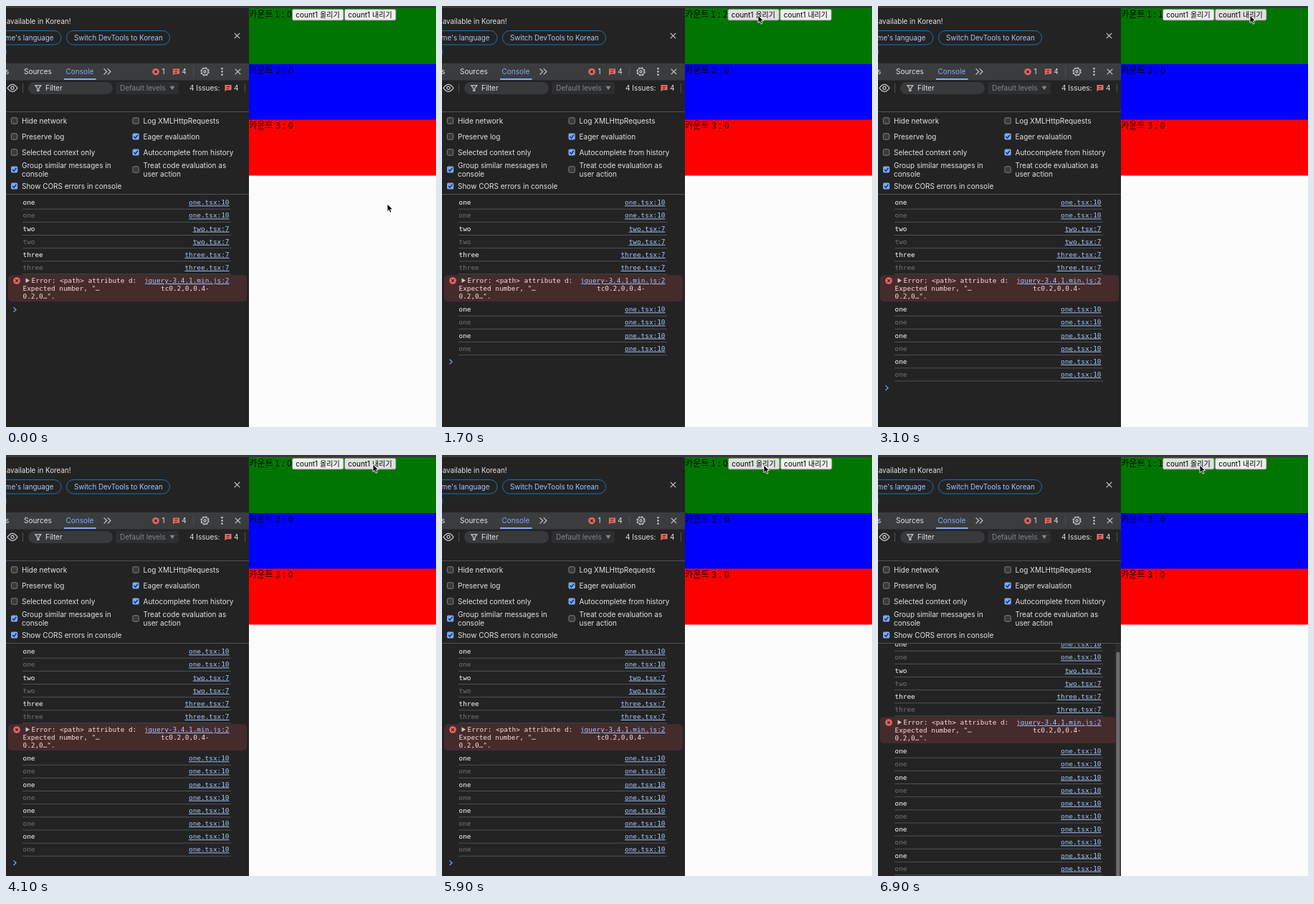
These frames come from a looping animation (600 by 587 pixels, 7000 ms). An HTML page:

```html
<!DOCTYPE html>
<html lang="en">
<head>
<meta charset="utf-8">
<title>Render log</title>
<style>
  html, body { margin: 0; width: 100%; height: 100%; overflow: hidden; background: #232324; }
  svg { display: block; width: 600px; height: 587px; }
  text { white-space: pre; }
  .ui { font: 10px Inter, "Noto Sans", sans-serif; fill: #e3e3e4; }
  .bar { font-size: 9.8px; }
  .blue { fill: #a8c7fa; }
  .mono { font: 9.4px "DejaVu Sans Mono", monospace; fill: #fff; }
  .dim { fill: #757577; }
  .link { fill: #a8c7fa; text-decoration: underline; text-anchor: end; }
  .err { fill: #f9dedc; }
  .page { font: 12px "Noto Sans CJK KR", "Noto Sans CJK", sans-serif; word-spacing: 1.2px; fill: #000; }
  .btn { font: 10px Inter, "Noto Sans CJK KR", "Noto Sans CJK", sans-serif; fill: #000; }
  .line { stroke: #505153; fill: none; }
  .icon { stroke: #c9cacc; stroke-width: 1.2; fill: none; }
</style>
</head>
<body>
<svg viewBox="0 0 600 587">
  <defs>
    <clipPath id="view"><rect y="263" width="339" height="324"/></clipPath>
    <g id="cross"><path class="icon" d="M-3.7-3.7 3.7 3.7M3.7-3.7-3.7 3.7"/></g>
    <g id="fail">
      <circle r="4.8" fill="#e46962"/>
      <path d="M-1.8-1.8 1.8 1.8M1.8-1.8-1.8 1.8" stroke="#33201f" stroke-width="1.2"/>
    </g>
    <g id="issue">
      <path d="M-4.6-4.2H4.6V3H-2.2L-4.6 5.2Z" fill="#e46962"/>
      <path d="M-2-1.8H2M-2 .8H1" stroke="#33201f"/>
    </g>
  </defs>

  <rect width="600" height="587" fill="#232324"/>
  <rect width="600" height="3" fill="#38393a"/>

  <!-- language bar -->
  <text class="ui bar" x="90.5" y="24.5" text-anchor="end">available in Korean!</text>
  <g fill="none" stroke="#1d72ad">
    <rect x="-40" y="34.5" width="117" height="19.5" rx="9.75"/>
    <rect x="84.5" y="34.5" width="144" height="19.5" rx="9.75"/>
    <rect x="-40" y="54.8" width="40.6" height="19.5" rx="9.75"/>
  </g>
  <text class="ui bar blue" x="66.5" y="47.5" text-anchor="end">me's language</text>
  <text class="ui bar blue" x="95" y="47.5">Switch DevTools to Korean</text>
  <use href="#cross" x="322.5" y="41.5"/>

  <!-- tabs -->
  <rect y="80" width="339" height="23.5" fill="#3b3c3d"/>
  <text class="ui" x="-1" y="95">s</text>
  <text class="ui" x="25" y="95">Sources</text>
  <text class="ui" x="83.5" y="95" style="fill:#7cacf8">Console</text>
  <rect x="81" y="101" width="44.5" height="2" fill="#7cacf8"/>
  <path class="icon" d="M136.5 87.3l4.2 4.2-4.2 4.2M141.7 87.3l4.2 4.2-4.2 4.2"/>
  <use href="#fail" x="209" y="91.7"/>
  <text class="ui" x="217.5" y="95.3">1</text>
  <use href="#issue" x="237.5" y="91.7"/>
  <text class="ui" x="245.3" y="95.3">4</text>
  <path class="line" d="M261.5 85V98"/>
  <circle class="icon" cx="277.5" cy="91.5" r="4.6"/>
  <circle class="icon" cx="277.5" cy="91.5" r="5.6" stroke-dasharray="2.4 2"/>
  <circle class="icon" cx="277.5" cy="91.5" r="1.6"/>
  <g fill="#d4d5d6">
    <circle cx="301.5" cy="87.2" r="1.2"/><circle cx="301.5" cy="91.5" r="1.2"/><circle cx="301.5" cy="95.8" r="1.2"/>
  </g>
  <use href="#cross" x="323.5" y="91.5"/>

  <!-- filter bar -->
  <path class="icon" d="M2 114.3Q9 104.3 16 114.3Q9 124.3 2 114.3Z"/>
  <circle class="icon" cx="9" cy="114.3" r="2.1"/>
  <path class="line" d="M23.5 108V121M333.5 108V121"/>
  <rect x="31" y="106" width="118" height="17" rx="8.5" fill="#38393b"/>
  <path class="icon" d="M40.8 110.8H48.8L45.8 114.6V118.4H43.8V114.6Z"/>
  <text class="ui" x="55" y="118">Filter</text>
  <rect x="153" y="106" width="88" height="17" rx="3" fill="#2d2e2f"/>
  <text class="ui" x="159" y="118" style="fill:#858688">Default levels</text>
  <path d="M228.5 111.8H235.5L232 117.3Z" fill="#858688"/>
  <text class="ui" x="256" y="118">4 Issues:</text>
  <use href="#issue" x="310" y="114.3"/>
  <text class="ui" x="318" y="118">4</text>
  <path class="line" d="M0 147.5H339M0 262.5H339"/>
  <g id="options"></g>

  <!-- console -->
  <g clip-path="url(#view)">
    <g id="log">
      <g id="rows"></g>
      <rect x="3" y="375.3" width="333" height="36.6" rx="5" fill="#462b2d"/>
      <use href="#fail" x="15" y="383"/>
      <path d="M27.5 379.4V386L33 382.7Z" fill="#d3c2c2"/>
      <text class="mono err" x="35.5" y="386">Error: &lt;path&gt; attribute d:</text>
      <text class="mono err" x="23.5" y="397">Expected number, "…</text>
      <text class="mono err" x="216" y="397">tc0.2,0,0.4-</text>
      <text class="mono err" x="23.5" y="408.3">0.2,0…".</text>
      <text class="mono link" x="311.5" y="386">jquery-3.4.1.min.js:2</text>
      <path id="prompt" d="M10.5-3.3 14 0 10.5 3.3" fill="none" stroke="#6ea3f2" stroke-width="1.3"/>
    </g>
    <g id="bar">
      <rect x="331" y="263" width="8" height="324" fill="#2c2c2d"/>
      <rect x="332.3" y="274.5" width="5.2" height="330" rx="2.6" fill="#6d6d6f"/>
    </g>
  </g>

  <!-- page -->
  <rect x="339" y="3" width="261" height="584" fill="#fdfcfd"/>
  <rect x="339" y="3" width="261" height="78" fill="#007500"/>
  <rect x="339" y="81" width="261" height="78" fill="#0000ff"/>
  <rect x="339" y="158.5" width="261" height="78" fill="#ff0000"/>
  <text class="page" x="339.3" y="15.5">카운트 <tspan dx="-1">1</tspan><tspan dx="-1"> : </tspan><tspan id="count">0</tspan></text>
  <text class="page" x="339.3" y="93.5">카운트 2 : 0</text>
  <text class="page" x="339.3" y="171.3">카운트 3 : 0</text>
  <g id="buttons"></g>
  <path id="cursor" d="M0 0V10.6L2.4 8.4 4.1 12.2 6 11.4 4.4 7.7H7.7Z" fill="#000" stroke="#fff" stroke-width=".9" stroke-linejoin="round"/>
</svg>
<script>
const $ = id => document.getElementById(id);
const PITCH = 18.15, LOOP = 7000;

// x, centre y, checked, lines
const options = [
  [7, 160, 0, 'Hide network'], [7, 182, 0, 'Preserve log'],
  [7, 204, 0, 'Selected context only'],
  [7, 228, 1, 'Group similar messages in', 'console'],
  [7, 251, 1, 'Show CORS errors in console'],
  [176.5, 160, 0, 'Log XMLHttpRequests'], [176.5, 182, 1, 'Eager evaluation'],
  [176.5, 204, 1, 'Autocomplete from history'],
  [176.5, 228, 0, 'Treat code evaluation as', 'user action']
];
$('options').innerHTML = options.map(([x, y, on, ...lines]) => {
  const box = on
    ? `<rect x="${x}" y="${y - 4.6}" width="9.2" height="9.2" rx="1.8" fill="#78a9f7"/>
       <path d="M${x + 2} ${y}l2 2.2 3.4-4.4" fill="none" stroke="#1c2c47" stroke-width="1.4"/>`
    : `<rect x="${x + .4}" y="${y - 4.2}" width="8.4" height="8.4" rx="1.6" fill="#3a3a3b" stroke="#88898b" stroke-width=".9"/>`;
  const top = y + 3.6 - (lines.length - 1) * 6;
  return box + lines.map((s, i) =>
    `<text class="ui" x="${x + 15}" y="${top + i * 12}">${s}</text>`).join('');
}).join('');

const logs = [['one', 10], ['two', 7], ['three', 7], ...Array(5).fill(['one', 10])];
$('rows').innerHTML = logs.map(([name, line], i) => {
  const y = i < 3 ? 274 + i * 2 * PITCH : 423 + (i - 3) * 2 * PITCH;
  const row = (y, cls) => `<text class="mono ${cls}" x="23.5" y="${y + 3.3}">${name}</text>
    <text class="mono link" x="311.5" y="${y + 3.3}">${name}.tsx:${line}</text>
    <path class="line" d="M23 ${y + 9.2}H314"/>`;
  return `<g>${row(y, '')}${row(y + PITCH, 'dim')}</g>`;
}).join('');
const pairs = [...$('rows').children];

$('buttons').innerHTML = ['올리기', '내리기'].map((s, i) =>
  `<g transform="translate(${i * 73} 0)">
    <rect x="399.5" y="4.5" width="71.5" height="15.5" rx="2" stroke="#808080" stroke-width=".9"/>
    <text class="btn" x="404.3" y="15.5">count1 ${s}</text></g>`).join('');
const faces = [...$('buttons').querySelectorAll('rect')];

// time, count after the click
const clicks = [[1000, 1], [1400, 2], [2800, 1], [3200, 0], [6700, 1]];
// time, x, y
const path = [
  [0, 532, 276], [100, 532, 276], [800, 441, 13], [1700, 441, 13], [2300, 519, 13],
  [3300, 519, 13], [3700, 512, 13], [4100, 512, 13], [4800, 449, 14], [LOOP, 449, 14]
];
const ease = u => u * u * (3 - 2 * u);

function cursorAt(t) {
  const i = path.findIndex((p, k) => k && t <= p[0]);
  const [t0, x0, y0] = path[i - 1], [t1, x1, y1] = path[i];
  const u = ease((t - t0) / (t1 - t0));
  return [x0 + (x1 - x0) * u, y0 + (y1 - y0) * u];
}

function draw(t) {
  const done = clicks.filter(c => c[0] <= t);
  const n = done.length, count = n ? done[n - 1][1] : 0;
  const full = n === clicks.length;
  pairs.forEach((g, i) => g.style.display = i < 3 + n ? '' : 'none');
  $('prompt').setAttribute('transform', `translate(0 ${423.5 + n * 2 * PITCH})`);
  $('log').setAttribute('transform', `translate(0 ${full ? -10 : 0})`);
  $('bar').style.display = full ? '' : 'none';

  const shift = [0, -2, -.6][count];
  $('count').textContent = count;
  $('count').setAttribute('dx', count === 1 ? -1 : 0);
  $('buttons').setAttribute('transform', `translate(${shift} 0)`);

  const [x, y] = cursorAt(t);
  faces.forEach((f, i) => {
    const dx = x - 399 - shift - i * 73;
    f.setAttribute('fill', dx > 0 && dx < 72 && y > 4 && y < 20 ? '#e0e0e0' : '#efefef');
  });
  $('cursor').setAttribute('transform', `translate(${x} ${y})`);
}

const start = performance.now();
function tick() {
  const t = (performance.now() - start) % LOOP;
  draw(Math.floor(t / 100) * 100);
  requestAnimationFrame(tick);
}
tick();
</script>
</body>
</html>
```
